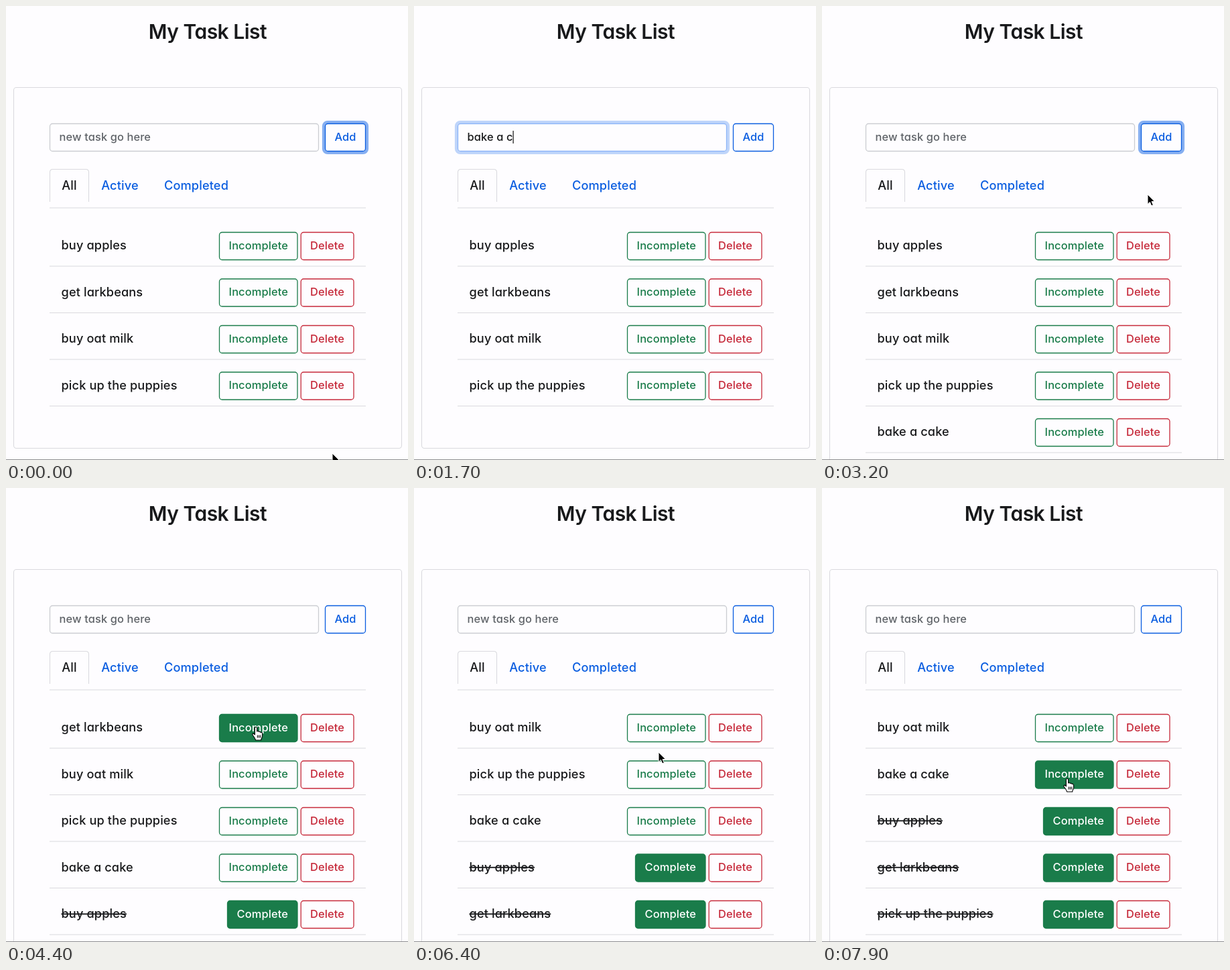
Animation, 600 px wide and 677 px high, one loop 8 s. Source, as an HTML page:

```html
<!DOCTYPE html>
<html lang="en">
<head>
<meta charset="utf-8">
<title>My Task List</title>
<style>
  html, body { margin: 0; width: 100%; height: 100%; overflow: hidden; background: #fefdff; }
  svg { display: block; width: 100%; height: 100%; }
  text {
    font: 450 18.2px Inter, "Open Sans", sans-serif;
    font-feature-settings: "cv11";
    font-optical-sizing: none;
    letter-spacing: .12px;
    fill: #18191b;
    white-space: pre;
  }
  .mid { text-anchor: middle; }
  .title { font-size: 30px; font-weight: 600; letter-spacing: -.5px; }
  .ctl { font-size: 16.4px; }
  .hint { fill: #5f6368; }
  .link { fill: #0a5de0; }
  .done { text-decoration: line-through; text-decoration-thickness: 1.4px; }
  .menu { font-size: 14px; font-weight: 400; font-feature-settings: normal; fill: #e8e8e8; }
  .line { fill: none; stroke: #dadade; stroke-width: 1.1; }
</style>
</head>
<body>
<svg id="stage" viewBox="0 0 600 677"></svg>
<script>
const LOOP = 8000, STEP = 100, MOVE = 400, ROW = 69.5;
const BLUE = '#0a5de0', GREEN = '#1a7c4a', RED = '#c62a3b';
const ENTRY = 'bake a cake';
const stage = document.getElementById('stage');

// when each task appears and when it is ticked off
const tasks = [
  { name: 'buy apples', done: 4300 },
  { name: 'get larkbeans', done: 5900 },
  { name: 'buy oat milk' },
  { name: 'pick up the puppies', done: 7500 },
  { name: ENTRY, from: 2800 }
];

const spots = {
  edge: [487, 667], field: [247, 185], low: [488, 566], add: [506, 200],
  tabs: [486, 281], corner: [549, 45], first: [373, 356], side: [524, 219],
  gap: [365, 394], left: [132, 540], right: [492, 597], second: [366, 433]
};

// each move eases to its spot within MOVE, or faster if the next one starts
const moves = [
  { at: 100, to: 'field' }, { at: 1700, to: 'low' }, { at: 1900, to: 'add' },
  { at: 2800, to: 'tabs' }, { at: 3400, to: 'corner' }, { at: 3800, to: 'first' },
  { at: 4400, to: 'side', dip: 290 }, { at: 5200, to: 'first' }, { at: 6000, to: 'gap' },
  { at: 6400, to: 'left' }, { at: 6600, to: 'right' }, { at: 6800, to: 'second' }
];

const between = (t, a, b) => t >= a && t < b;

function pointerAt(t) {
  let [x, y] = spots.edge;
  moves.forEach((m, i) => {
    if (t <= m.at) return;
    const end = i + 1 < moves.length ? moves[i + 1].at : LOOP;
    const u = Math.min(1, (t - m.at) / Math.min(MOVE, end - m.at));
    const e = u * u * (3 - 2 * u), [tx, ty] = spots[m.to];
    x += (tx - x) * e;
    y += (ty - y) * e + (m.dip || 0) * Math.sin(Math.PI * u);
  });
  return { x, y };
}

const inside = (p, x, y, w, h) => p.x >= x && p.x <= x + w && p.y >= y && p.y <= y + h;
const text = (x, y, s, cls = '') => `<text x="${x}" y="${y}" class="${cls}">${s}</text>`;
const line = d => `<path class="line" d="${d}"/>`;
const box = (x, y, w, h, r, stroke, fill = 'none', sw = 1.3) =>
  `<rect x="${x}" y="${y}" width="${w}" height="${h}" rx="${r}" stroke="${stroke}" fill="${fill}" stroke-width="${sw}"/>`;

function button(x, y, w, label, color, filled) {
  return box(x, y, w, 41, 4, color, filled ? color : 'none') +
    `<text class="ctl mid" x="${x + w / 2}" y="${y + 25.3}" style="fill:${filled ? '#fff' : color}">${label}</text>`;
}

const ring = (x, y, w, color) => box(x - 2.4, y - 2.4, w + 4.8, 45.8, 6, color, 'none', 4.4);

const cursors = {
  arrow: `<path d="M0 0V14.5l3.4-3.1 2.3 5.5 2.6-1.1-2.3-5.3h4.5z" fill="#000" stroke="#fff"/>`,
  hand: `<path d="M-1.6 1.5Q0-1 1.6 1.5V7q1.8-1.2 2.8.6 1.8-.9 2.7.8 2.2-.4 2.5 1.6v4q-.5 3-1.8 4.500V20H-.3q-1-3-4.400-7.500-1.200-2 .8-2.400 1.200 0 2.300 1.800z
    M2.400 12.500v4m2.200-4v4m2.200-4v4" fill="#fff" stroke="#000" stroke-width="1.1" stroke-linejoin="round"/>`,
  beam: `<path d="M-3.5-7.5Q0-7.5 0-5Q0-7.5 3.5-7.5M0-5V6M-3.5 8.5Q0 8.5 0 6Q0 8.5 3.5 8.5M-1.8 3.5h3.6" fill="none" stroke="#111" stroke-width="1.4"/>`
};

const cursor = (p, kind) =>
  `<g transform="translate(${p.x.toFixed(1)} ${p.y.toFixed(1)})">${cursors[kind]}</g>`;

function dropdown() {
  const items = ['silly otter', 'test', 'sdfdsfd', 'hello pal'];
  return `<path d="M187 227l9-8.5q2-2 4 0l9 8.5z" fill="#232528"/>` +
    `<rect x="174" y="226" width="106" height="168" rx="5" fill="#232528"/>` +
    items.map((s, i) => text(188, 255.8 + i * 39.7, s, 'menu')).join('');
}

function draw(t) {
  const p = pointerAt(t);
  const shown = !between(t, 800, 1800);
  const over = (...r) => shown && inside(p, ...r);
  const typing = between(t, 500, 2600);
  const addFocus = t < 500 || between(t, 2600, 4200);
  const overAdd = over(476, 175, 61, 42);
  let hand = overAdd || over(65, 243, 285, 50);

  const rank = k => k.done <= t ? k.done : 0;
  const list = tasks.filter(k => !(k.from > t)).sort((a, b) => rank(a) - rank(b));

  let out = text(301, 48.5, 'My Task List', 'title mid') +
    `<rect class="line" x="11.5" y="121.5" width="579" height="${260 + ROW * list.length}" rx="4"/>`;

  // entry field
  if (typing) out += ring(65.5, 175.5, 401, '#bfd5fa');
  out += box(65.5, 175.5, 401, 41, 4, typing ? '#8db5f8' : '#cbcdd2', '#fefdff');
  const count = between(t, 900, 2800) ? Math.min(ENTRY.length, Math.floor((t - 900) / 114) + 1) : 0;
  out += count
    ? text(79.5, 200.8, ENTRY.slice(0, count), 'ctl entry')
    : text(79.5, 200.8, 'new task go here', 'ctl hint');
  if (typing) out += `<rect id="caret" x="79.5" y="186" width="1.2" height="19" fill="#111"/>`;

  if (addFocus) out += ring(476.5, 175.5, 60, '#86aff1');
  out += button(476.5, 175.5, 60, 'Add', BLUE, overAdd);

  // tabs
  out += line('M65 301H537') + line('M65.5 292V248q0-4.5 4.5-4.5h49q4.5 0 4.5 4.5v44') +
    text(94.5, 274, 'All', 'mid') + text(170, 274, 'Active', 'mid link') +
    text(284, 274, 'Completed', 'mid link');

  list.forEach((k, i) => {
    const y = 337.5 + i * ROW, done = k.done <= t;
    const x = done ? 330.5 : 318.5, w = 435 - x;
    const overState = over(x, y, w, 41), overDelete = over(440, y, 79, 41);
    hand = hand || overState || overDelete;
    out += text(82.5, y + 25.8, k.name, done ? 'done' : '') +
      button(x, y, w, done ? 'Complete' : 'Incomplete', GREEN, done || overState) +
      button(440.2, y, 78.8, 'Delete', RED, overDelete) +
      line(`M65 ${y + 50.5}H537`);
  });

  if (between(t, 500, 800)) out += dropdown();
  out += `<path d="M0 676.5H600" stroke="#8e8e90"/>`;
  if (shown) out += cursor(p, hand ? 'hand' : over(65, 175, 402, 42) ? 'beam' : 'arrow');

  stage.innerHTML = out;
  const entry = stage.querySelector('.entry'), caret = stage.querySelector('#caret');
  if (entry && caret) caret.setAttribute('x', 79.5 + entry.getComputedTextLength());
}

let last = -1;
function tick() {
  const t = Math.floor(performance.now() % LOOP / STEP) * STEP;
  if (t !== last) draw(last = t);
  requestAnimationFrame(tick);
}
tick();
</script>
</body>
</html>
```
